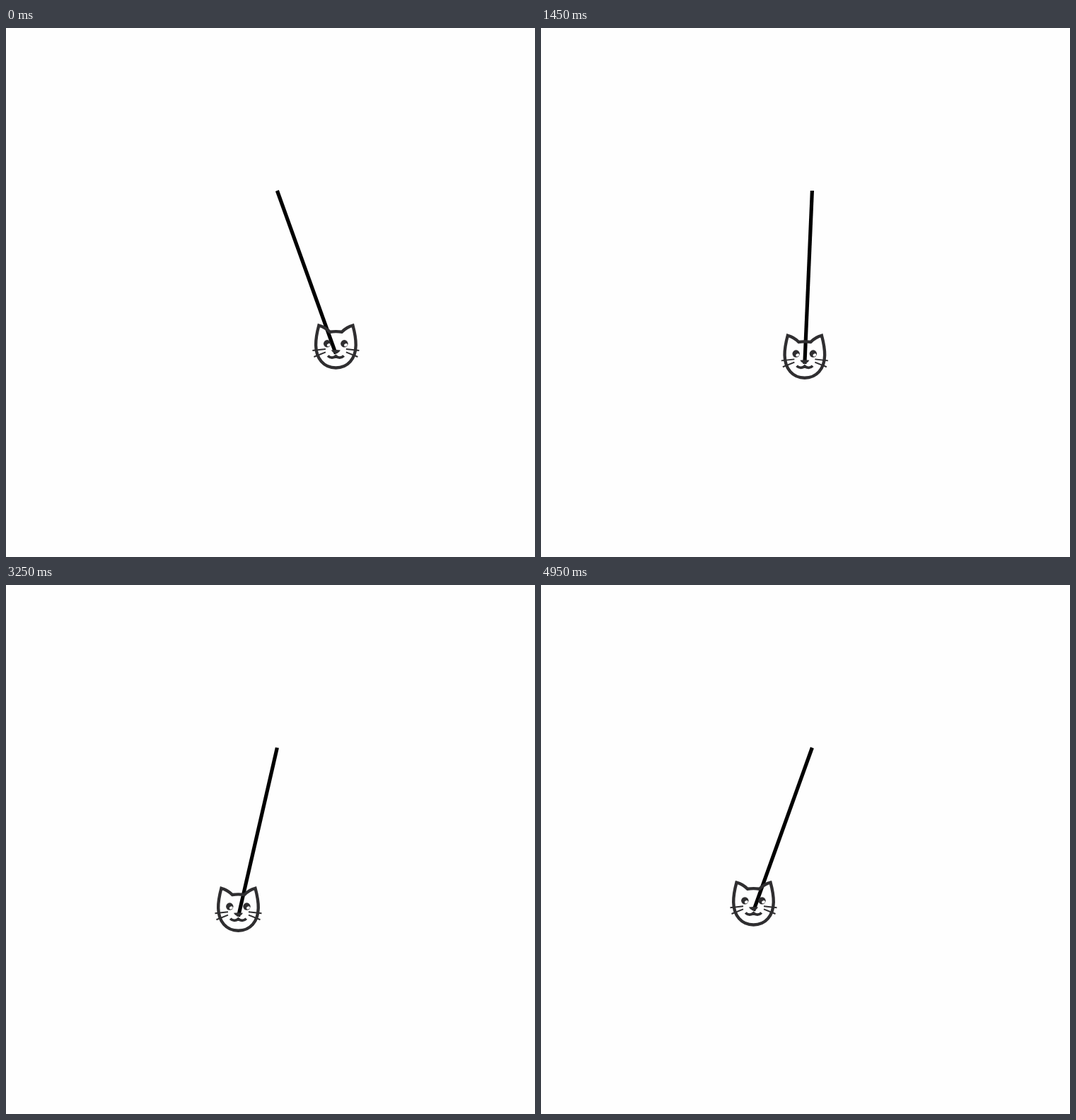
Animation, 748 px wide and 748 px high, one loop 5000 ms. Source, as an HTML page:

```html
<!DOCTYPE html>
<html lang="en">
<head>
<meta charset="utf-8">
<title>Cat pendulum</title>
<style>
  html, body { margin: 0; width: 100%; height: 100%; overflow: hidden; background: #fefefe; }
  svg { display: block; width: 100%; height: 100%; }
</style>
</head>
<body>
<svg viewBox="0 0 748 748">
  <defs>
    <g id="eye">
      <circle r="5.2" fill="#2f2e30"/>
      <ellipse cx="2" cy="1.9" rx="2.5" ry="2" transform="rotate(-25 2 1.9)" fill="#fefefe"/>
    </g>
    <path id="whiskers" d="M14.5-6.4L33-4.4M14.5-2.2L31 4.5" stroke-width="2"/>
  </defs>
  <line id="rod" stroke="#000" stroke-width="5.2"/>
  <g id="cat" fill="none" stroke="#2f2e30">
    <path stroke-width="4.4" d="M-24-40C-18-38.5-13-35.5-8.5-30.8Q0-32 8.5-30.8C13-35.5 18-38.5 24-40
      C27-29 28.4-19 28.3-12C28 7 17 20 0 20C-17 20-28 7-28.3-12C-28.4-19-27-29-24-40Z"/>
    <use href="#whiskers"/>
    <use href="#whiskers" transform="scale(-1 1)"/>
    <path stroke-width="3.8" d="M-11.3 3C-8 6.4-3 6.2 0 3.4C3 6.2 8 6.4 11.3 3"/>
    <path fill="#2f2e30" stroke="none" d="M-6.5-5Q0-6 6.5-5Q5-1.5 0-.2Q-5-1.5-6.5-5Z"/>
    <g stroke="none">
      <use href="#eye" x="-12.2" y="-14.2"/>
      <use href="#eye" x="12" y="-14.2"/>
    </g>
  </g>
</svg>
<script>
  const LOOP = 5000, STEP = 50;
  const PIVOT = { x: 383.4, y: 230 }, LENGTH = 245;
  const SWING = 19.8 * Math.PI / 180, HALF_PERIOD = 993;
  const rod = document.getElementById('rod');
  const cat = document.getElementById('cat');
  const start = performance.now();

  function setAttrs(el, attrs) {
    for (const key in attrs) el.setAttribute(key, attrs[key]);
  }

  function draw(ms) {
    const t = Math.floor((ms % LOOP) / STEP) * STEP;
    const angle = SWING * Math.cos(Math.PI * t / HALF_PERIOD);
    const x = PIVOT.x + LENGTH * Math.sin(angle);
    const y = PIVOT.y + LENGTH * Math.cos(angle);
    setAttrs(rod, { x1: PIVOT.x, y1: PIVOT.y, x2: x, y2: y });
    setAttrs(cat, { transform: `translate(${x} ${y})` });
  }

  function tick() {
    draw(performance.now() - start);
    requestAnimationFrame(tick);
  }

  draw(0);
  requestAnimationFrame(tick);
</script>
</body>
</html>
```
